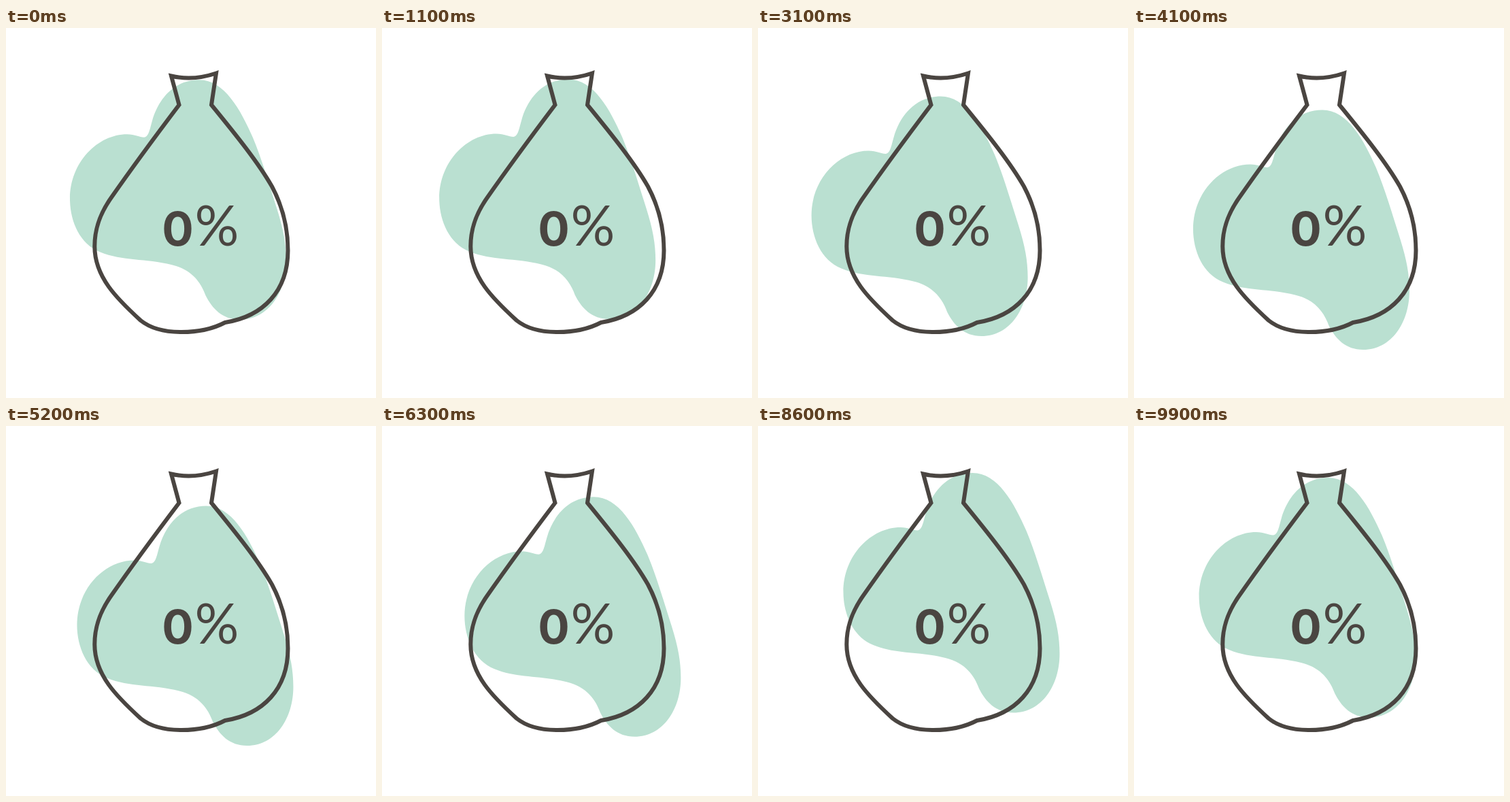
Animation, 544 px wide and 544 px high, one loop 10 s. Source, as an HTML page:

```html
<!DOCTYPE html>
<html lang="en">
<head>
<meta charset="utf-8">
<title>Filling bag</title>
<style>
  html, body { margin: 0; width: 100%; height: 100%; overflow: hidden; background: #fff; }
  svg { display: block; width: 100vw; height: 100vh; }
  text { fill: #4a4541; text-anchor: middle; }
  .digit { font: 700 69px Inter, sans-serif; }
  .sign { font: 400 81px Lato, sans-serif; }
</style>
</head>
<body>
<svg viewBox="0 0 544 544">
  <path id="blob" fill="#bae0d1" d="M284 76
    C321 76 345 120 363 161 C376 192 387 230 398.5 266 C408 296 412 318 412 342
    C412 388 386 428.5 344 428.5 C318 428.5 303 412 293.5 393 C287 375 274 355 244 348
    C205 338 172 343 138 329 C108 317 94 283 94 251 C94 197 135 156 178 156
    C190 156 196 160.5 203 160.5 C210 160.5 212 146 215 136 C224 104 247 76 284 76Z"/>
  <path fill="none" stroke="#4a4541" stroke-width="6" stroke-miterlimit="10" d="M302 113
    L309 66.5 Q275 78 243 70.5 L254.5 113 C225 152 185 206 155 249
    C138 273 130.3 295 130.3 321 C130.3 366 163 398 198 430 C213 442 234 447 258 447
    C283 447 305 442 322 433 C378 424 414.5 387 414.5 327
    C414.5 292 407 263 391 233 C371 198 338 157 302 113Z"/>
  <text class="digit" x="252.5" y="320">0</text>
  <text class="sign" x="310" y="320">%</text>
</svg>
<script>
const LOOP = 10000, STEP = 100;
const blob = document.getElementById('blob');

// Evenly timed points of the closed path the blob drifts along
const path = [
  [0, 0.3], [-9, -0.6], [-16, 1.2], [-15.8, 22.3], [-8.3, 43.6],
  [7.3, 42.8], [22.8, 33], [36.8, 15], [43.1, -6], [21.5, -5.3]
];

// Closed Catmull-Rom spline, with p in 0..1 along the loop
function drift(p) {
  const n = path.length, i = Math.floor(p * n), u = p * n - i;
  const [a, b, c, d] = [-1, 0, 1, 2].map(k => path[(i + k + n) % n]);
  return [0, 1].map(j => b[j] + u / 2 * (c[j] - a[j]
    + u * (2 * a[j] - 5 * b[j] + 4 * c[j] - d[j]
    + u * (3 * (b[j] - c[j]) + d[j] - a[j]))));
}

function draw() {
  const t = Math.floor(performance.now() % LOOP / STEP) * STEP;
  blob.setAttribute('transform', `translate(${drift(t / LOOP)})`);
  requestAnimationFrame(draw);
}
draw();
</script>
</body>
</html>
```
